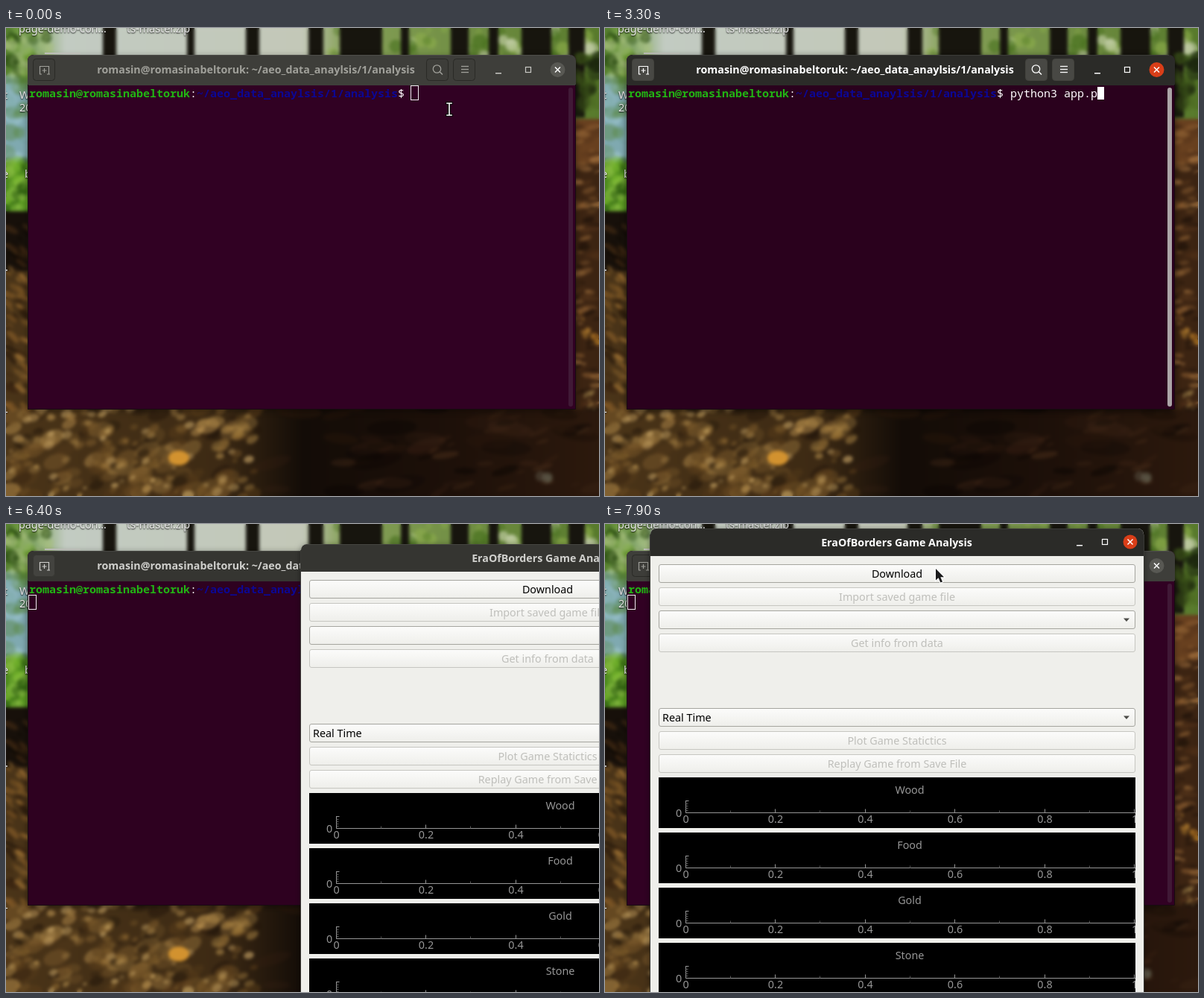
An HTML page with a canvas that plays this animation: 796x628 px, repeating every 8 s.

```html
<!DOCTYPE html>
<html lang="en">
<head>
<meta charset="utf-8">
<title>Terminal launch</title>
<style>
html, body { margin: 0; width: 100%; height: 100%; overflow: hidden; background: #1c120a; }
canvas { display: block; width: 796px; height: 628px; }
</style>
</head>
<body>
<canvas id="stage" width="796" height="628"></canvas>
<script>
const W = 796, H = 628, LOOP = 8000;
const g = document.getElementById('stage').getContext('2d');
const SANS = '"Noto Sans", "Open Sans", sans-serif';
const UI = '14.35px ' + SANS;
const BOLD = 'bold 14.25px ' + SANS;
const MONO = '15px "Noto Sans Mono", "DejaVu Sans Mono", monospace';
const USER = 'romasin@romasinabeltoruk';
const PATH = '~/aeo_data_anaylsis/1/analysis';
const COMMAND = 'python3 app.py';

// Timelines: [start ms, value...]
const typed = [[0, 0], [1100, 1], [1200, 2], [1400, 4], [1700, 6], [1900, 8], [2700, 9],
  [2800, 11], [3000, 12], [3300, 13], [3500, 14]];
const caret = [[0, 'hollow'], [300, 'on'], [1000, 'off'], [1100, 'on'], [2500, 'off'], [2700, 'on'],
  [4000, 'off'], [4300, 'on'], [4900, 'off'], [5400, 'on'], [6000, 'off'], [6400, 'hollow']];
const termFocus = [[0, 0], [300, .25], [400, .5], [500, .75], [600, 1], [6400, .5], [6500, .2], [6600, 0]];
const appFocus = [[0, 0], [6400, .5], [6500, .8], [6600, 1]];
const appPos = [[0, 396, 27], [6500, 270, 18], [6600, 135, 10], [6700, 91, 7], [6800, 70, 5],
  [6900, 62, 5], [7000, 61, 6]];
const mouse = [[0, 595, 109, 'beam'], [1000, 593, 109, 'beam'], [1100, 0, 0, ''],
  [6000, 690, 96, 'beam'], [6100, 770, 72, 'arrow'], [6200, 0, 0, ''],
  [6500, 716, 40, 'hand'], [6600, 581, 34, 'hand'], [6700, 537, 28, 'hand'], [6800, 520, 23, 'hand'],
  [6900, 514, 20, 'hand'], [7000, 503, 27, 'hand'], [7400, 505, 24, 'arrow'],
  [7700, 470, 40, 'arrow'], [7800, 359, 56, 'arrow'], [7900, 444, 60, 'arrow']];

function at(list, t) {
  let row = list[0];
  for (const r of list) if (r[0] <= t) row = r;
  return row;
}

function mix(a, b, k) {
  return 'rgb(' + a.map((v, i) => Math.round(v + (b[i] - v) * k)).join(',') + ')';
}

function rect(x, y, w, h, color, c = g) {
  c.fillStyle = color;
  c.fillRect(x, y, w, h);
}

function text(s, x, y, font, color, align = 'left') {
  g.font = font;
  g.fillStyle = color;
  g.textAlign = align;
  g.fillText(s, x, y);
}

function line(color, width, ...points) {
  g.strokeStyle = color;
  g.lineWidth = width;
  g.beginPath();
  for (let i = 0; i < points.length; i += 4) {
    g.moveTo(points[i], points[i + 1]);
    g.lineTo(points[i + 2], points[i + 3]);
  }
  g.stroke();
}

function box(x, y, w, h, r, fill, stroke) {
  g.beginPath();
  g.roundRect(x, y, w, h, r);
  if (fill) { g.fillStyle = fill; g.fill(); }
  if (stroke) { g.strokeStyle = stroke; g.lineWidth = 1; g.stroke(); }
}

function makeLayer() {
  const layer = document.createElement('canvas');
  layer.width = W;
  layer.height = H;
  return layer;
}

// Out-of-focus woodland: soft trunks, leaves and leaf litter
function makeForest() {
  const raw = makeLayer(), c = raw.getContext('2d');
  let seed = 7;
  const rnd = () => (seed = (seed * 16807) % 2147483647) / 2147483647;

  function blobs(n, x, y, w, h, colors, size, alpha, tilt = 0, flat = 1) {
    for (let i = 0; i < n; i++) {
      const r = size * (.4 + rnd());
      c.globalAlpha = alpha * (.4 + .6 * rnd());
      c.fillStyle = colors[Math.floor(rnd() * colors.length)];
      c.beginPath();
      c.ellipse(x + rnd() * w, y + rnd() * h, r, r * flat, tilt + rnd() * .5, 0, 7);
      c.fill();
    }
    c.globalAlpha = 1;
  }

  const ground = c.createLinearGradient(0, 0, W, 0);
  ground.addColorStop(0, '#4a3418');
  ground.addColorStop(.36, '#3d2a14');
  ground.addColorStop(.5, '#130c07');
  ground.addColorStop(.75, '#1d1009');
  ground.addColorStop(1, '#2c190d');
  rect(0, 0, W, H, ground, c);

  const sky = c.createLinearGradient(0, 0, W, 0);
  sky.addColorStop(0, '#55802c');
  sky.addColorStop(.06, '#8fae78');
  sky.addColorStop(.1, '#c2cbc2');
  sky.addColorStop(.5, '#c3c8b8');
  sky.addColorStop(.57, '#86a058');
  sky.addColorStop(1, '#587a2c');
  rect(0, 0, W, 125, sky, c);
  blobs(60, 0, 0, 60, 70, ['#2b4d12', '#6fa032', '#a8c07c'], 7, .8);
  blobs(50, 430, 0, 366, 40, ['#47701d', '#8fb04c', '#c4cfa8'], 8, .7);
  for (const [x, w] of [[130, 18], [243, 10], [322, 18], [406, 20], [448, 57], [530, 11],
    [597, 24], [648, 13], [692, 40], [755, 22]]) rect(x, 0, w, 120, '#17150e', c);
  blobs(24, 765, 35, 31, 85, ['#2a3a12', '#49661f', '#18200d'], 9, .7);

  rect(0, 75, 32, 105, '#7fa9b0', c);
  blobs(26, 0, 70, 30, 110, ['#9cc3cb', '#58853c', '#6f9f9b'], 9, .6);
  rect(0, 180, 32, 66, '#4d8a1d', c);
  blobs(34, 0, 178, 30, 66, ['#74b42c', '#2d5c10', '#8cc044'], 7, .7);
  rect(0, 246, 32, 80, '#17100a', c);
  blobs(20, 0, 262, 30, 64, ['#4a2f16', '#0c0704'], 8, .6, .3, .4);
  blobs(60, 0, 322, 30, 196, ['#8a5f28', '#3a2410', '#b1803a', '#22150a'], 8, .7, .4, .4);

  rect(762, 122, 34, 60, '#68401f', c);
  rect(762, 182, 34, 330, '#3c2412', c);
  blobs(90, 764, 125, 32, 390, ['#8f6032', '#1a0f08', '#a97742', '#54331a'], 8, .7, -.4, .4);
  blobs(8, 768, 380, 26, 60, ['#d08a26', '#e0a03a'], 4, .7);
  blobs(7, 772, 490, 22, 24, ['#c9a860', '#a88447'], 6, .8, -.8, .4);

  blobs(170, 0, 505, 340, 125, ['#8a6631', '#a98345', '#20140a', '#5b3e1b'], 13, .6, -.6, .6);
  blobs(90, 0, 510, 330, 118, ['#c39a55', '#d0ac6a', '#966f34'], 6, .6, -.6, .7);
  blobs(45, 340, 510, 456, 118, ['#2d190d', '#0a0604', '#3a2315'], 26, .5, -.3, .3);
  blobs(22, 560, 515, 236, 110, ['#51331c', '#3d2515'], 14, .5, -.6, .25);
  c.fillStyle = '#d2922f';
  c.beginPath();
  c.ellipse(232, 577, 14, 10, 0, 0, 7);
  c.fill();
  blobs(3, 716, 600, 12, 20, ['#6d6a58'], 8, .5);

  const out = makeLayer(), o = out.getContext('2d');
  o.drawImage(raw, 0, 0);
  o.filter = 'blur(2px)';
  o.drawImage(raw, 0, 0);
  return out;
}
const forest = makeForest();

function desktop() {
  g.drawImage(forest, 0, 0);
  g.shadowColor = '#000';
  g.shadowBlur = 2;
  g.shadowOffsetY = 1;
  for (const [s, x, y] of [['page-demo-con…', 17, 6], ['ts-master.zip', 162, 6], ['t', -3, 95],
    ['W', 18, 95], ['20', 18, 112], ['e', -5, 201], ['b', 25, 201], ['.', -1, 326], ['-', -2, 520]])
    text(s, x, y, UI, '#eee');
  g.shadowColor = 'transparent';
  g.shadowOffsetY = g.shadowBlur = 0;
  rect(52, 33, 48, 2, '#c9cbc4');
}

function frame(x, y, w, h, barH, focus, body) {
  g.shadowColor = 'rgba(0,0,0,' + (.35 + .2 * focus) + ')';
  g.shadowBlur = 9;
  g.shadowOffsetY = 2;
  box(x, y, w, h, [8, 8, 0, 0], body);
  g.shadowColor = 'transparent';
  g.shadowBlur = g.shadowOffsetY = 0;
  box(x, y, w, barH, [8, 8, 0, 0], mix([62, 62, 58], [43, 43, 40], focus));
  line('rgba(255,255,255,.08)', 1, x + 8, y + .5, x + w - 8, y + .5);
}

function winButtons(min, max, close, y, r, focus) {
  const ink = mix([200, 200, 196], [255, 255, 255], focus);
  rect(min - 4, y + 4, 8, 1.5, ink);
  g.strokeStyle = ink;
  g.lineWidth = 1.2;
  g.strokeRect(max - 3.5, y - 3.5, 7, 7);
  g.fillStyle = mix([88, 88, 83], [217, 62, 24], focus);
  g.beginPath();
  g.arc(close, y, r, 0, 7);
  g.fill();
  line('#fff', 1.5, close - 3.5, y - 3.5, close + 3.5, y + 3.5, close + 3.5, y - 3.5, close - 3.5, y + 3.5);
}

function terminal(t) {
  const f = at(termFocus, t)[1];
  const ink = mix([160, 160, 154], [255, 255, 255], f);
  const body = mix([49, 1, 35], [42, 1, 29], f);
  frame(29, 36, 736, 476, 41, f, body);
  line('#180a12', 1, 29.5, 76, 29.5, 511.5, 29.5, 511.5, 764.5, 511.5, 764.5, 511.5, 764.5, 76);

  for (const x of [37, 565, 601])
    box(x - .5, 41.5, 29, 29, 4, mix([61, 61, 57], [72, 72, 68], f), mix([42, 42, 38], [66, 66, 61], f));
  line(ink, 1.2, 45, 62, 48, 62, 45.5, 62, 45.5, 51, 45, 51.5, 58, 51.5, 57.5, 51, 57.5, 62, 55, 62, 59, 62,
    48.5, 57, 54.5, 57, 51.5, 54, 51.5, 60);
  g.strokeStyle = ink;
  g.lineWidth = 1.3;
  g.beginPath();
  g.arc(578.5, 55, 5.2, 0, 7);
  g.stroke();
  line(ink, 1.5, 582.5, 59, 586, 62.5);
  for (const y of [51.5, 55.5, 59.5]) line(ink, 1.3, 611, y, 621, y);
  text(USER + ': ' + PATH, 335.5, 61, BOLD, ink, 'center');
  winButtons(661, 701, 740.5, 56, 10, f);

  text(USER, 31, 93, 'bold ' + MONO, '#22b414');
  text(':', 247, 93, MONO, '#fff');
  text(PATH, 256, 93, 'bold ' + MONO, '#0c0795');
  const n = at(typed, t)[1];
  text('$ ' + COMMAND.slice(0, n), 526, 93, MONO, '#fff');

  const entered = t >= 4500;
  const cx = entered ? 31 : 544 + n * 9, cy = entered ? 97 : 79;
  const mode = at(caret, t)[1];
  if (mode === 'on') rect(cx, cy, 9, 17, '#fff');
  if (mode === 'hollow') {
    g.strokeStyle = '#eee';
    g.lineWidth = 1;
    g.strokeRect(cx - .5, cy - 1.5, 10, 19);
  }
  const hover = t >= 6100 && t < 6200;
  box(hover ? 754 : 755, 80, hover ? 8 : 6, 428, 3, mix([64, 25, 54], [171, 164, 167], f));
}

function button(label, x, y, color, align = 'center') {
  const fill = g.createLinearGradient(0, y, 0, y + 25);
  fill.addColorStop(0, '#fcfcfb');
  fill.addColorStop(1, '#eeeeea');
  const live = color === '#000';
  box(x + .5, y + .5, 639, 24, 2.5, fill, live ? '#a5a59f' : '#c6c6c1');
  text(label, align === 'left' ? x + 5 : x + 320, y + 18, UI, color, align);
}

function combo(label, x, y) {
  button(label, x, y, '#000', 'left');
  g.fillStyle = '#4c4c48';
  g.beginPath();
  g.moveTo(x + 624, y + 10.5);
  g.lineTo(x + 632, y + 10.5);
  g.lineTo(x + 628, y + 15);
  g.fill();
}

function plot(name, x, y) {
  const gray = '#969696', dim = '#565656', ax = x + 36.5, ay = y + 47.5;
  g.save();
  g.beginPath();
  g.rect(x, y, 640, 68);
  g.clip();
  rect(x, y, 640, 68, '#000');
  text(name, x + 337, y + 22, UI, gray, 'center');
  line(gray, 1, ax, y + 31, ax, ay, ax, ay, x + 640, ay, ax, y + 31.5, ax + 4, y + 31.5);
  for (let i = 1; i < 5; i++) line(dim, 1, ax, ay - i * 3, ax + 3, ay - i * 3);
  text('0', x + 27, y + 53, UI, gray, 'center');
  for (let i = 0; i <= 10; i++) {
    const tx = Math.round(ax + i * 60.25) - .5;
    line(i % 2 ? dim : gray, 1, tx, ay - (i % 2 ? 3 : 5), tx, ay);
    if (i % 2 === 0) text(String(i / 10), ax + i * 60.25, y + 61, UI, gray, 'center');
  }
  g.restore();
}

function app(t) {
  const [, x, y] = at(appPos, t);
  const f = at(appFocus, t)[1];
  const left = x + 11, off = '#bfbfbb';
  g.globalAlpha = t < 5500 ? .6 : 1;
  frame(x, y, 662, 680, 37, f, '#efefeb');
  line('#3a3a36', 1, x - .5, y + 8, x - .5, H, x + 662.5, y + 8, x + 662.5, H);
  text('EraOfBorders Game Analysis', x + 330.5, y + 24, BOLD, mix([160, 160, 154], [255, 255, 255], f), 'center');
  winButtons(x + 576, x + 610, x + 644, y + 18, 9.5, f);
  button('Download', left, y + 48, '#000');
  button('Import saved game file', left, y + 79, off);
  combo('', left, y + 110);
  button('Get info from data', left, y + 141, off);
  combo('Real Time', left, y + 241);
  button('Plot Game Statictics', left, y + 272, off);
  button('Replay Game from Save File', left, y + 303, off);
  ['Wood', 'Food', 'Gold', 'Stone'].forEach((name, i) => plot(name, left, y + 334 + i * 74));
  g.globalAlpha = 1;
}

const pointers = {
  beam() {
    const bars = [-3, -8, 3, -8, 0, -8, 0, 8, -3, 8, 3, 8];
    g.lineCap = 'square';
    line('#000', 3.6, ...bars);
    line('#fff', 1.6, ...bars);
    g.lineCap = 'butt';
  },
  arrow() {
    const shape = new Path2D('M0 0V15.5L3.6 12.2L6.3 18.6L9 17.4L6.3 11.3H11Z');
    g.lineWidth = 2;
    g.strokeStyle = '#fff';
    g.stroke(shape);
    g.fillStyle = '#1c1c1c';
    g.fill(shape);
  },
  hand() {
    const shape = new Path2D('M-4 6L-7 1Q-7 -2 -4 -1V-4Q-3 -7 -1 -5Q1 -8 3 -5Q7 -7 7 -3V2L5 6Z');
    g.lineWidth = 2;
    g.strokeStyle = '#111';
    g.stroke(shape);
    g.fillStyle = '#fff';
    g.fill(shape);
  }
};

function pointer(t) {
  const [, x, y, kind] = at(mouse, t);
  if (!kind) return;
  g.save();
  g.translate(x, y);
  pointers[kind]();
  g.restore();
}

function draw(t) {
  const shown = t >= 5400, raised = t >= 6400;
  desktop();
  if (shown && !raised) app(t);
  terminal(t);
  if (raised) app(t);
  pointer(t);
}

let last = -1;
function tick() {
  const t = Math.floor((performance.now() % LOOP) / 100) * 100;
  if (t !== last) draw(last = t);
  requestAnimationFrame(tick);
}
tick();
</script>
</body>
</html>
```
